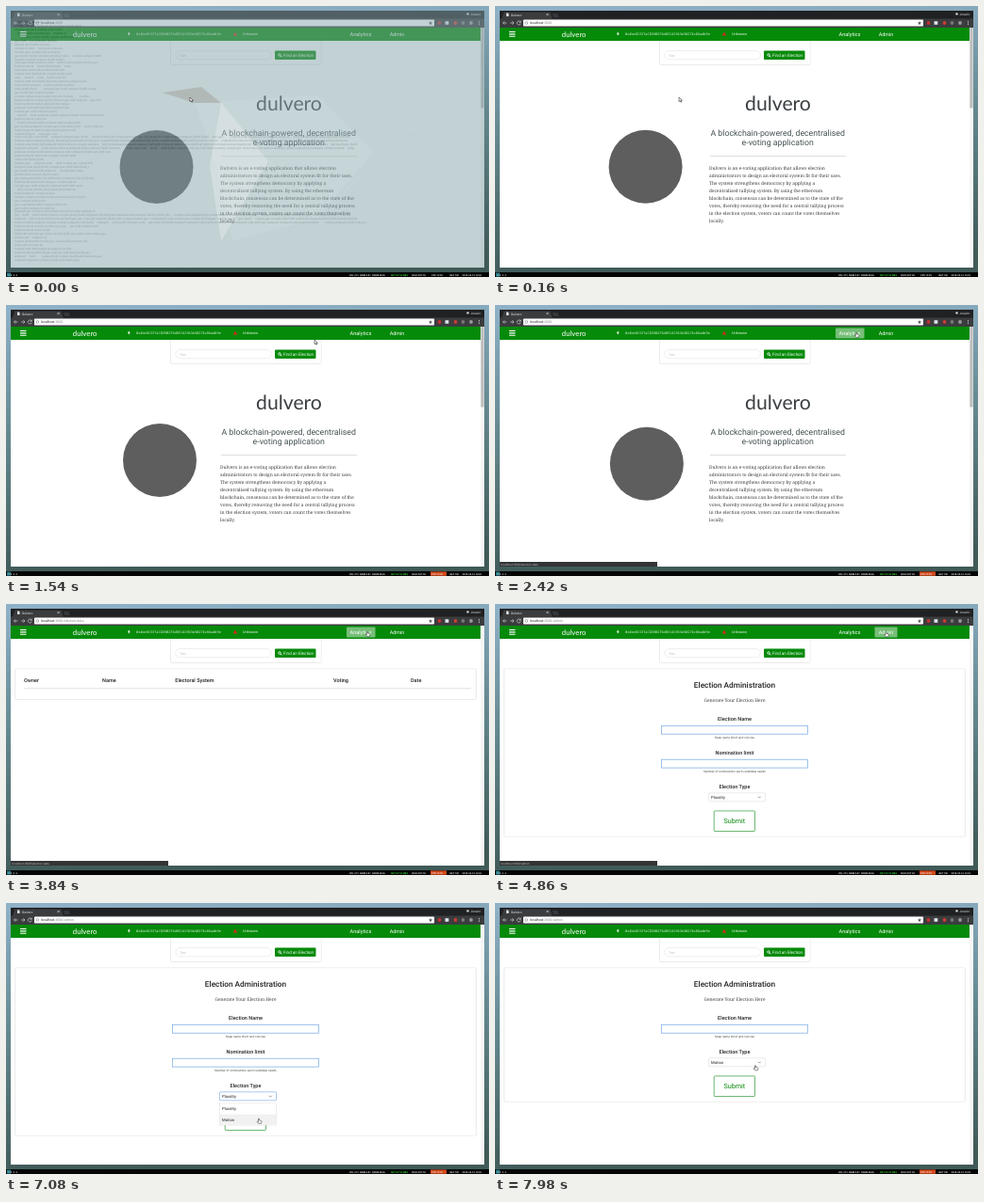
Recreate the animation shown at these times as an HTML page. Size 512x288 px, loop 8000 ms.

```html
<!DOCTYPE html>
<html lang="en">
<meta charset="utf-8">
<title>Voting app walkthrough</title>
<style>
  html, body { margin: 0; width: 100%; height: 100%; overflow: hidden; background: #000; }
  svg { display: block; width: 100vw; height: 100vh; }
  text { font-family: Roboto, sans-serif; text-rendering: geometricPrecision; white-space: pre; }
  .serif { font-family: "Noto Serif", serif; font-size: 4.8px; fill: #3c3c3c; }
  .mono { font-family: "Noto Sans Mono", monospace; }
  .logo { font-family: Lato, sans-serif; }
  .mid { text-anchor: middle; }
  .label { font-size: 5.5px; font-weight: 500; fill: #222; }
  .hint { font-size: 3.2px; fill: #444; }
  .card { fill: #fff; stroke: #e8e8e8; stroke-width: .4; filter: drop-shadow(0 .6px .6px #0003); }
  .field { fill: #fff; stroke: #74a7e2; stroke-width: .7; }
  .icon { fill: none; stroke: #ccc; stroke-width: .7; }
</style>
<svg viewBox="0 0 512 288">
  <defs>
    <linearGradient id="sky" x2=".1" y2="1">
      <stop stop-color="#8fb2c9"/><stop offset=".45" stop-color="#668a92"/><stop offset="1" stop-color="#405a58"/>
    </linearGradient>
  </defs>
  <rect width="512" height="288" fill="url(#sky)"/>

  <g id="desk">
    <rect x="5" y="5" width="502" height="273" fill="#83a3a8"/>
    <path d="M200 103l130-8 60 60-60 70-90 25-20-90z" fill="#fff" opacity=".08"/>
    <path d="M228 103l50 62-50 85-12-80z" fill="#fff" opacity=".25"/>
    <path d="M166 92l41-6 21 17h-28z" fill="#4c5148" opacity=".6"/>
    <path d="M228 103L330 225 430 130 500 200" fill="none" stroke="#fff" stroke-width=".5" opacity=".2"/>
    <g id="terminal" class="mono" font-size="3" fill="#1c3840" opacity=".9"></g>
  </g>

  <g id="browser">
    <rect x="5" y="5" width="502" height="273" fill="#fff"/>
    <rect x="5" y="5" width="502" height="9" fill="#202123"/>
    <path d="M7 14l2.5-7.5h49l2.5 7.5z" fill="#3b3c3e"/>
    <path d="M62 12l-1.5-4h6l1.5 4z" fill="#36373a"/>
    <rect x="5" y="13.5" width="502" height="9.5" fill="#3b3c3e"/>
    <path d="M12 7.5h1.8l.8.8v2.7H12z" fill="#ddd"/>
    <text x="17" y="10.5" font-size="3.4" fill="#eee">Dulvero</text>
    <path class="icon" d="M54.5 8l2.2 2.2m0-2.2l-2.2 2.2" stroke-width=".5"/>
    <circle cx="489.5" cy="8.4" r="1.2" fill="#ddd"/>
    <text x="492.5" y="9.7" font-size="3.3" fill="#eee">Joravin</text>
    <path class="icon" d="M12.5 18h-4m1.7-1.7L8.5 18l1.7 1.7M16 18h4m-1.7-1.7L20 18l-1.7 1.7"/>
    <path class="icon" d="M27 17a2 2 0 1 0 .2 1.6M27.2 15.6v1.7h-1.7"/>
    <rect x="30" y="14.6" width="424" height="6.9" rx=".7" fill="#fff"/>
    <circle cx="33.3" cy="18" r="1.4" fill="none" stroke="#666" stroke-width=".5"/>
    <text x="37" y="19.3" font-size="3.55" fill="#888"><tspan fill="#222">localhost</tspan>:3000<tspan id="path"></tspan></text>
    <path d="M450 16l.6 1.4 1.5.1-1.2 1 .4 1.5-1.3-.8-1.3.8.4-1.5-1.2-1 1.5-.1z" fill="#555"/>
    <circle cx="459.5" cy="18" r="1.9" fill="#c33030"/>
    <rect x="465.5" y="16.2" width="3.8" height="3.6" fill="#dde4ec"/>
    <circle cx="476.5" cy="18" r="1.9" fill="#c93b35"/>
    <circle cx="484.5" cy="18" r="1.9" fill="#777"/>
    <circle cx="493" cy="18" r="1.9" fill="#999"/>
    <path d="M501.5 16v.9m0 .7v.9m0 .7v.9" stroke="#ddd" stroke-width=".9"/>

    <rect x="503" y="23" width="4" height="255" fill="#f6f6f6"/>
    <rect class="card" x="174.5" y="30" width="159.5" height="32.3" rx="1"/>
    <rect x="5" y="23" width="498" height="14" fill="#068a0a"/>
    <path d="M15 27.5h6.5M15 29.9h6.5M15 32.3h6.5" stroke="#fff" stroke-width="1.1"/>
    <text class="logo" x="70.8" y="33" font-size="7.8" fill="#fff">dulvero</text>
    <path d="M130.3 27.5l1.3 2-1.3 2-1.3-2z" fill="#cfe8cf"/>
    <text class="mono" x="138" y="31" font-size="3.57" fill="#e8f5e8">0x4be81537aCD390276d85141963e50274c86adb9e</text>
    <path d="M243 27.6l2.2 4h-4.4z" fill="#d8291c"/>
    <text x="251" y="31" font-size="3.9" fill="#e8f5e8">Unknown</text>
    <rect id="hoverData" x="361" y="24.5" width="30.5" height="11" rx=".8" fill="#fff" opacity=".45"/>
    <rect id="hoverAdmin" x="402.5" y="24.5" width="24" height="11" rx=".8" fill="#fff" opacity=".45"/>
    <text class="mid" x="376" y="31.8" font-size="5.6" fill="#fff">Analytics</text>
    <text class="mid" x="414.5" y="31.8" font-size="5.4" fill="#fff">Admin</text>
    <rect x="179.8" y="47.6" width="101.5" height="9.2" rx="4.6" fill="#fff" stroke="#dcdcdc" stroke-width=".5"/>
    <text x="184" y="53.5" font-size="3.5" fill="#bbb">Test</text>
    <rect x="285" y="47.5" width="43.5" height="9.5" rx="1" fill="#068a0a"/>
    <path d="M291 53l1.3 1.3" stroke="#fff" stroke-width=".9"/>
    <circle cx="290" cy="52" r="1.3" fill="none" stroke="#fff" stroke-width=".7"/>
    <text x="294" y="53.8" font-size="4.55" fill="#fff">Find an Election</text>

    <g id="home">
      <rect x="503.4" y="23" width="3.2" height="85.5" fill="#bdbdbd"/>
      <circle id="emblem" r="39" fill="#5e5e5e"/>
      <text class="logo mid" x="300" y="111" font-size="21.2" fill="#3a3f42">dulvero</text>
      <g class="mid" font-size="8.78" fill="#445052">
        <text x="299.7" y="137.6">A blockchain-powered, decentralised</text>
        <text x="299.7" y="148.4">e-voting application</text>
      </g>
      <path d="M228 159.7h144" stroke="#ccc" stroke-width=".7"/>
      <g id="intro"></g>
    </g>

    <g id="data">
      <rect class="card" x="9.8" y="69" width="488.5" height="32.3" rx="1"/>
      <g class="label">
        <text x="19" y="83.3">Owner</text><text x="102" y="83.3">Name</text>
        <text x="179.3" y="83.3">Electoral System</text>
        <text x="347" y="83.3">Voting</text><text x="429" y="83.3">Date</text>
      </g>
      <path d="M19 89.7h474" stroke="#ccc" stroke-width=".6"/>
    </g>

    <g id="admin">
      <rect id="adminCard" class="card" x="9.8" y="69" width="488.5" height="178" rx="1"/>
      <g class="mid">
        <text x="254" y="89" font-size="8.25" font-weight="500" fill="#222">Election Administration</text>
        <text class="serif" x="254" y="103.5">Generate Your Election Here</text>
        <text class="label" x="254" y="124">Election Name</text>
        <text class="hint" x="254" y="143.1">Keep name short and concise</text>
      </g>
      <rect class="field" x="176.6" y="129.3" width="154.8" height="8.9"/>
      <g id="limit" class="mid">
        <text class="label" x="254" y="159.8">Nomination limit</text>
        <rect class="field" x="176.6" y="165.2" width="154.8" height="8.9"/>
        <text class="hint" x="254" y="179">Number of nominations each candidate needs</text>
      </g>
      <g id="lower">
        <text class="label mid" x="254" y="195.6">Election Type</text>
        <rect id="select" x="226.5" y="200.8" width="60" height="9" rx=".8" fill="#fff" stroke-width=".6"/>
        <text id="choice" x="229" y="206.8" font-size="4.2" fill="#222"></text>
        <path d="M279 204.7l1.4 1.4 1.4-1.4" fill="none" stroke="#555" stroke-width=".6"/>
        <rect x="232.2" y="219.9" width="43.3" height="21.6" rx=".8" fill="#fff" stroke="#2c9a35" stroke-width=".7"/>
        <text class="mid" x="253.8" y="233.2" font-size="7.2" fill="#068a0a">Submit</text>
        <g id="menu">
          <rect class="card" x="226.5" y="0" width="60" height="23"/>
          <rect id="menuHover" x="227" width="59" height="11.2" fill="#f1f1f1"/>
          <text x="229" y="7.4" font-size="4.2" fill="#222">Plurality</text>
          <text x="229" y="18.8" font-size="4.2" fill="#222">Motion</text>
        </g>
      </g>
    </g>

    <g id="status">
      <rect x="5" y="273" width="167" height="5" fill="#333436"/>
      <text id="link" x="6.3" y="276.7" font-size="3.1" fill="#bbb"></text>
    </g>
  </g>

  <rect y="283" width="512" height="5" fill="#050505"/>
  <rect x="1" y="283.6" width="4" height="4" fill="#2b7f8c"/>
  <g class="mono" font-size="2.5" font-weight="700" fill="#ddd">
    <text x="2.2" y="286.7">1  2  3  4</text>
    <text x="364" y="286.7">VOL 31%  MEM 2.81  HOME 226G</text>
    <text x="408" y="286.7" fill="#2fc42f">NET UP 54 MBS</text>
    <text x="430" y="286.7">IN 30 OUT 00</text>
    <rect id="alert" x="450" y="283.4" width="17" height="4.4" fill="#d84a1b"/>
    <text x="451" y="286.7">CPU 12.90</text>
    <text x="470.5" y="286.7">BAT 100</text>
    <text x="483.5" y="286.7">2018-03-16 16:03</text>
  </g>

  <g id="cursor" stroke-width=".5">
    <path id="arrow" d="M0 0v4.6l1.1-1 .8 1.7.8-.4-.8-1.6h1.5z" fill="#fff" stroke="#111"/>
    <path id="hand" d="M-.5.3q.5-.7 1 0v1.6l2 .5q.6.3.4 1.2l-.5 1.7H-.4L-1.8 3.4q0-.7.7-.4l.6.5z" fill="#fff" stroke="#222"/>
  </g>
</svg>
<script>
  const $ = id => document.getElementById(id);
  const LOOP = 8000, DATA_AT = 2720, ADMIN_AT = 4520, OPEN_AT = 6040, PICK_AT = 7300;
  const clamp = x => Math.max(0, Math.min(1, x));
  const show = (id, on) => $(id).style.display = on ? '' : 'none';
  const addText = (parent, x, y, string, cls) => {
    const el = document.createElementNS('http://www.w3.org/2000/svg', 'text');
    el.setAttribute('x', x);
    el.setAttribute('y', y);
    if (cls) el.setAttribute('class', cls);
    el.textContent = string;
    $(parent).append(el);
  };

  [
    'Dulvero is an e-voting application that allows election',
    'administrators to design an electoral system fit for their uses.',
    'The system strengthens democracy by applying a',
    'decentralised tallying system. By using the ethereum',
    'blockchain, consensus can be determined as to the state of the',
    'votes, thereby removing the need for a central tallying process',
    'in the election system, voters can count the votes themselves',
    'locally.'
  ].forEach((line, i) => addText('intro', 227, 173.8 + i * 8, line, 'serif'));

  let seed = 7;
  const random = () => (seed = seed * 16807 % 2147483647) / 2147483647;
  const words = ['node', 'build/contracts', '0x00', 'compile', 'gas:', '[ok]', 'module', 'webpack', '{built}', '   '];
  for (let row = 0; row < 65; row++) {
    const wide = (row > 30 && row < 35) || (row > 51 && row < 55);
    const length = wide ? 272 : 20 + random() * 55;
    let line = '';
    while (line.length < length) line += words[random() * words.length | 0] + ' ';
    addText('terminal', 9, 18 + row * 3.95, line.slice(0, length));
  }

  // Cursor stops: time, x, y
  const stops = [
    [0, 195, 97], [1080, 195, 97], [1540, 327, 37], [1900, 383, 29], [3840, 383, 29],
    [4360, 414.5, 29.5], [4880, 414.5, 29.5], [5750, 270, 203], [6280, 270, 203],
    [6850, 268, 229], [7380, 268, 229], [7940, 276, 172.5], [LOOP, 276, 172.5]
  ];
  const cursorAt = t => {
    const i = stops.findIndex(s => s[0] > t);
    const [t0, x0, y0] = stops[i - 1], [t1, x1, y1] = stops[i];
    const p = (t - t0) / (t1 - t0), e = p * p * (3 - 2 * p);
    return [x0 + (x1 - x0) * e, y0 + (y1 - y0) * e];
  };

  function draw(t) {
    const page = t < DATA_AT ? 'home' : t < ADMIN_AT ? 'data' : 'admin';
    ['home', 'data', 'admin'].forEach(name => show(name, name === page));
    $('path').textContent = { home: '', data: '/election-data', admin: '/admin' }[page];
    $('browser').style.opacity = clamp(.5 + t / 240);
    show('desk', t < 130);
    show('alert', t >= 1080);

    const sway = (1 - Math.cos(t * Math.PI / 1540)) / 2;
    $('emblem').setAttribute('cx', 159.5 + 3.5 * sway);
    $('emblem').setAttribute('cy', 171 - 6 * sway);

    const [x, y] = cursorAt(t);
    const inside = (x0, y0, x1, y1) => x > x0 && x < x1 && y > y0 && y < y1;
    const overData = inside(361, 24.5, 391.5, 35.5);
    const overAdmin = inside(402.5, 24.5, 426.5, 35.5);
    show('hoverData', overData);
    show('hoverAdmin', overAdmin);
    show('status', overData || overAdmin);
    $('link').textContent = 'localhost:3000/' + (overData ? 'election-data' : 'admin');

    const picked = t >= PICK_AT, shift = picked ? -36 : 0;
    const open = t >= OPEN_AT && !picked;
    const p = picked ? 1 - clamp((t - PICK_AT) / 200) : clamp((t - OPEN_AT) / 200);
    const unfold = 1 - (1 - p) ** 2;
    show('limit', !picked);
    $('lower').setAttribute('transform', `translate(0 ${shift})`);
    $('adminCard').setAttribute('height', 178 + shift);
    $('choice').textContent = picked ? 'Motion' : 'Plurality';
    $('select').setAttribute('stroke', open ? '#6ea3e0' : '#dcdcdc');
    show('menu', unfold > 0);
    $('menu').style.opacity = unfold;
    $('menu').setAttribute('transform', `translate(0 ${210 + 3 * unfold}) scale(1 ${unfold})`);
    $('menuHover').setAttribute('y', y > 224 || picked ? 11.5 : .3);

    const overSelect = page === 'admin' && inside(226, 200 + shift, 288, (open ? 237 : 210) + shift);
    const link = overData || overAdmin || overSelect;
    show('hand', link);
    show('arrow', !link);
    $('cursor').setAttribute('transform', `translate(${x} ${y})`);
  }

  const tick = () => {
    draw(performance.now() % LOOP);
    requestAnimationFrame(tick);
  };
  tick();
</script>
</html>
```
